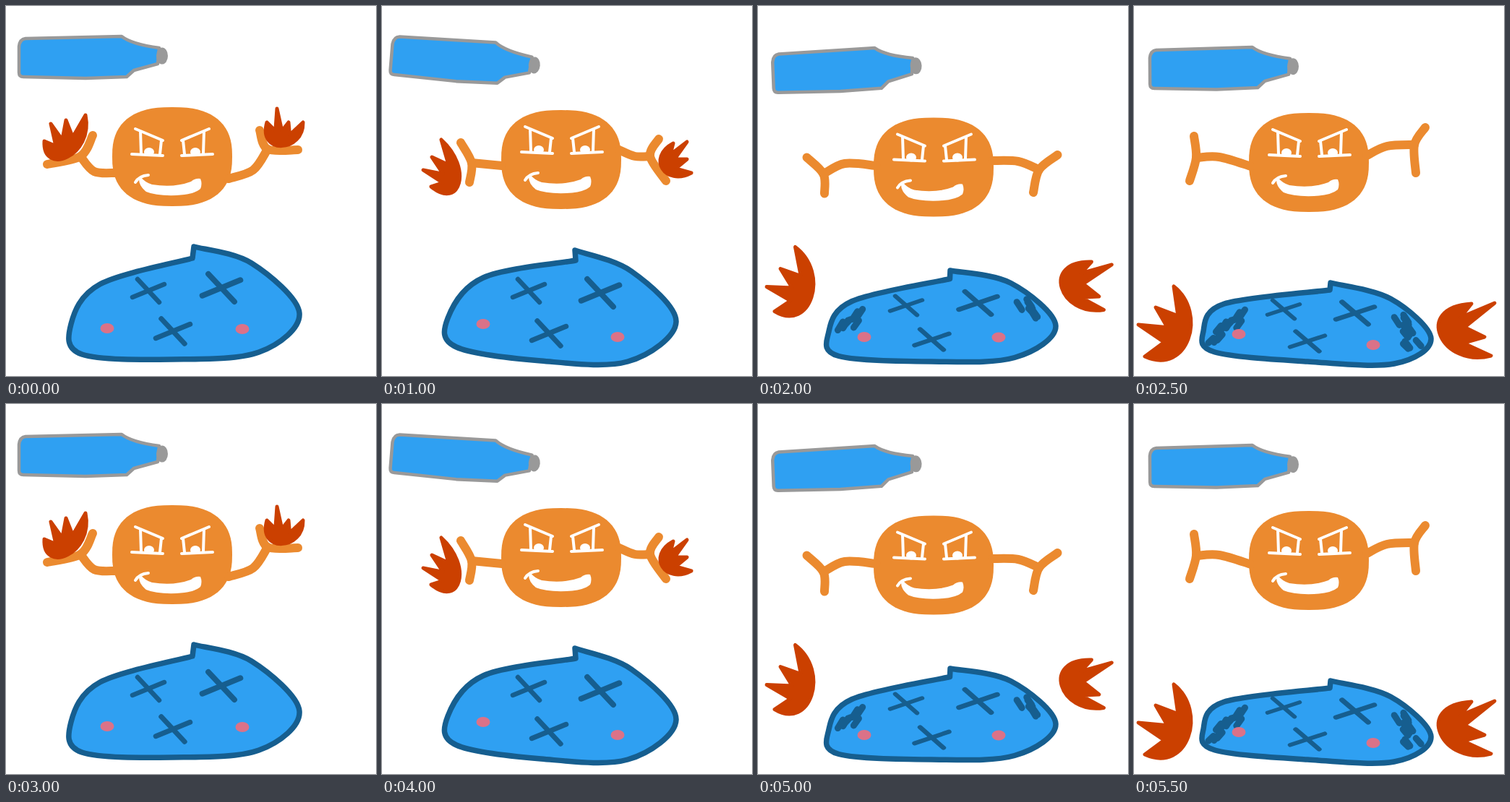
An HTML page that plays this animation: 512x512 px, repeating every 6 s.

```html
<!DOCTYPE html>
<html lang="en">
<head>
<meta charset="utf-8">
<title>Fire against water</title>
<style>
html, body { margin: 0; width: 100%; height: 100%; overflow: hidden; background: #fff; }
svg { display: block; width: 100vw; height: 100vh; }
path { fill: none; stroke-linecap: round; stroke-linejoin: round; }
.pose { visibility: hidden; animation: show 3s step-end infinite; }
@keyframes show {
  0% { visibility: visible; }
  16.6666%, 100% { visibility: hidden; }
}
.glass { fill: #2fa0f2; stroke: #999; stroke-width: 4.5; }
.cap { fill: #999; }
.skin { fill: #eb8a2f; }
.limb { stroke: #eb8a2f; stroke-width: 12; }
.fire { fill: #cb4000; stroke: #cb4000; stroke-width: 5; }
.ink { stroke: #fff; stroke-width: 4; }
.white { fill: #fff; }
.water { fill: #2fa0f2; stroke: #165e8f; stroke-width: 7.5; }
.mark { stroke: #165e8f; stroke-width: 6.5; }
.scrib { stroke: #165e8f; stroke-width: 9; }
.cheek { fill: #db7288; }
</style>
</head>
<body>
<svg id="stage" viewBox="0 0 512 512" xmlns="http://www.w3.org/2000/svg"></svg>
<script>
// Points are written as "x y x y ..."
const pts = s => {
  const a = s.split(' ').map(Number);
  return a.flatMap((v, i) => i % 2 ? [] : [[v, a[i + 1]]]);
};
const mix = (p, q, t = 0.5) =>
  Array.isArray(p) ? p.map((v, i) => mix(v, q[i], t)) : p + (q - p) * t;
const rnd = seed => {
  const v = Math.sin(seed * 127.1) * 43758.5453;
  return v - Math.floor(v) - 0.5;
};

// Smooth open path through points
function curve(p) {
  const at = i => p[Math.max(0, Math.min(p.length - 1, i))];
  const handle = (a, b, c, s) => a.map((v, k) => v + s * (c[k] - b[k]) / 6);
  return 'M' + p[0] + p.slice(1).map((q, i) =>
    `C${handle(p[i], at(i - 1), q, 1)} ${handle(q, p[i], at(i + 2), -1)} ${q}`).join('');
}
const path = (cls, d) => `<path class="${cls}" d="${d}"/>`;
const oval = (cls, [x, y], rx, ry) =>
  `<ellipse class="${cls}" cx="${x}" cy="${y}" rx="${rx}" ry="${ry}"/>`;
const move = (t, s) => `<g transform="${t}">${s}</g>`;
const shift = (p, s) => move(`translate(${p})`, s);

const bottle = path('glass', 'M27 45L160 42Q174 53 212 58L210 80L177 89L167 98L110 100L24 98Q18 98 18 92V56Q19 46 27 45Z')
  + oval('cap', [216, 69], 8, 11.5);

// Rounded box: a superellipse
const pow = v => Math.sign(v) * Math.abs(v) ** 0.8;
const body = path('skin', 'M' + Array.from({ length: 72 }, (_, i) => {
  const a = i * Math.PI / 36;
  return [230 + 83 * pow(Math.cos(a)), 208.5 + 68.5 * pow(Math.sin(a))];
}).join('L') + 'Z');

const eye = path('ink', 'M179 170L217 186M186 173L187 204M215 186L213 205M174 205L217 207')
  + oval('white', [198, 202], 7, 6);
const face = eye + move('translate(460 0) scale(-1 1)', eye)
  + path('white', 'M186 236Q192 244 202 247Q232 252 256 243Q262 238 269 239Q272 246 269 253Q260 261 236 262Q208 263 194 257Q184 249 184 240Z')
  + path('ink', 'M179 244Q184 235 197 234');

// Four tips, then the two handles of the round belly
function flame(p) {
  const tips = p.slice(0, 4), [c1, c2] = p.slice(4);
  const heel = mix(c1, c2);
  const edge = tips.slice(1).map((t, i) => {
    const dip = mix(mix(tips[i], t), heel, 0.4);
    return `L${dip}L${t}`;
  });
  return path('fire', `M${tips[0]}${edge.join('')}C${c1} ${c2} ${tips[0]}Z`);
}

// Shoulder, elbow, wrist, then both ends of the hand
const arm = p => path('limb', curve(p.slice(0, 3)));
const hand = p => path('limb', curve([p[3], p[2], p[4]]));

const cross = ([x, y], size, flat) => move(
  `translate(${x} ${y}) scale(${size} ${size * flat})`,
  path('mark', 'M-15 -16L15 16M-22 9L22 -9'));

// Short strokes scattered from one point to another
function scribble([from, to], count, dx) {
  let d = '';
  for (let i = 0; i < count; i++) {
    const [x, y] = mix(from, to, i / (count - 1));
    d += `M${x + 22 * rnd(i + 1)} ${y + 16 * rnd(i + 30)}l${dx} ${9 + 5 * rnd(i + 60)}`;
  }
  return path('scrib', d);
}

const pose = o => ({ ...o, arms: o.arms.map(pts), fires: o.fires.map(pts),
  pool: pts(o.pool), spots: pts(o.spots), scrib: (o.scrib || []).map(pts) });
const glare = [1, -7];

const hold = pose({
  tilt: 0, flask: [0, 0], at: [0, 0], look: [0, 0], flat: 1, count: 0,
  arms: ['152 231 122 229 103 208 57 219 120 179', '308 239 342 227 362 198 351 172 404 199'],
  fires: ['53 187 62 163 83 158 110 151 122 208 50 236', '361 161 375 142 391 161 411 161 412 203 348 206'],
  pool: '260 333 340 356 406 425 350 479 230 489 105 482 90 440 130 385 258 349',
  spots: '197 394 298 390 231 450 140 446 327 447'
});
const aim = pose({
  tilt: 4.7, flask: [-5, 3], at: [18, 4], look: glare, flat: 1, count: 0,
  arms: ['166 221 145 219 124 217 109 189 121 244', '328 199 350 208 371 208 383 184 393 242'],
  fires: ['82 185 69 209 57 227 68 250 108 283 126 225', '403 190 422 188 422 212 428 231 392 250 366 210'],
  pool: '267 338 345 367 407 437 340 492 220 491 103 472 91 432 140 376 268 352',
  spots: '203 394 302 397 231 453 140 440 326 458'
});
const toss = pose({
  tilt: -4.3, flask: [1.5, 22], at: [14, 21], look: glare, flat: 0.85, count: 3,
  arms: ['165 220 122 227 95 255 52 239 107 277', '326 221 370 236 390 261 426 244 372 285'],
  fires: ['48 279 32 310 18 336 31 360 70 393 98 315', '456 296 480 305 459 346 463 357 407 358 397 287'],
  pool: '260 349 345 362 413 425 350 478 240 492 112 490 99 455 135 405 260 362',
  spots: '203 409 303 397 241 459 149 462 335 448',
  scrib: ['133 417 123 428', '360 384 375 387']
});
const burn = pose({
  tilt: -0.4, flask: [4, 15.5], at: [12, 8], look: glare, flat: 0.8, count: 11,
  arms: ['162 222 118 209 86 210 83 180 77 242', '322 207 350 194 388 192 403 168 390 231'],
  fires: ['55 388 30 417 6 441 15 485 75 512 102 425', '467 412 499 411 485 458 494 484 427 502 384 417'],
  pool: '272 383 355 405 411 460 360 495 240 492 112 479 96 450 125 412 271 393',
  spots: '207 420 306 425 240 464 145 454 331 469',
  scrib: ['150 419 117 462', '364 426 385 470']
});

// In-betweens: hands swinging outward, and the flames about to land
const swing = {
  ...hold, tilt: -3, flask: [0, -3.5], at: [8, 2], swing: 34,
  spots: mix(hold.spots, aim.spots)
};
const hit = { ...burn };
for (const key of Object.keys(toss)) hit[key] = mix(toss[key], burn[key]);
hit.look = glare;

function draw(p, i) {
  const [left, right] = p.scrib;
  const limbs = p.arms.map((a, k) => {
    const side = k ? 1 : -1;
    const turn = p.swing ? `translate(${k ? -13 : 0} 2) rotate(${side * p.swing} ${a[2]})` : '';
    return arm(a) + move(turn, hand(a) + flame(p.fires[k]));
  });
  return `<g class="pose" style="animation-delay:${i * 0.5 - 3}s">`
    + move(`translate(${p.flask}) rotate(${p.tilt} 95 71)`, bottle)
    + shift(p.at, body) + limbs.join('') + shift(p.at, shift(p.look, face))
    + path('water', curve(p.pool) + 'Z')
    + (p.count ? scribble(left, p.count, -7) + scribble(right, p.count, 7) : '')
    + p.spots.map((s, k) => k < 3 ? cross(s, [1, 1.2, 1.08][k], p.flat) : oval('cheek', s, 9.5, 7)).join('')
    + '</g>';
}

document.getElementById('stage').innerHTML =
  [hold, swing, aim, toss, hit, burn].map(draw).join('');
</script>
</body>
</html>
```
